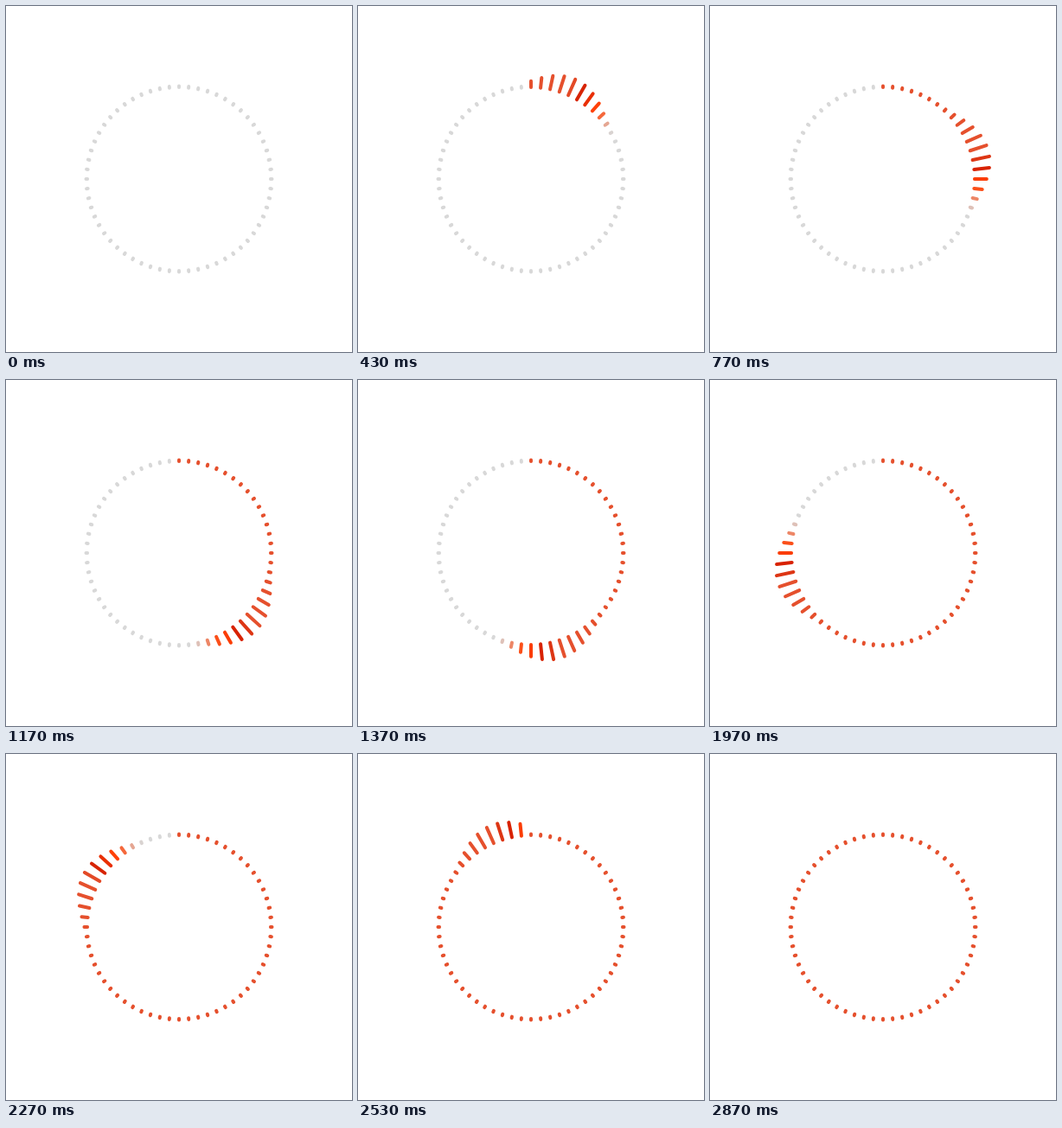
Recreate the animation shown at these times as an HTML page. Size 400 px wide and 400 px high, loop 3530 ms.

```html
<!DOCTYPE html>
<html lang="en">
<head>
<meta charset="utf-8">
<title>Tick ring</title>
<style>
  html, body { margin: 0; width: 100%; height: 100%; overflow: hidden; background: #fff; }
  svg { display: block; width: 100%; height: 100%; }
  line { stroke-width: 4; stroke-linecap: round; }
</style>
</head>
<body>
<svg id="stage" viewBox="0 0 400 400"></svg>
<script>
const LOOP = 3530, COUNT = 60;
const START = 15, STAGGER = 40, DURATION = 510;
const INNER = 105.9, OUTER = 107.5, GROWTH = 18.5;

// Progress and RGB colour of each stop.
const COLORS = [
  [0, [216, 216, 216]],
  [0.28, [255, 64, 4]],
  [0.4, [214, 32, 0]],
  [0.53, [229, 80, 45]],
  [1, [229, 80, 45]]
];

const clamp = x => Math.min(1, Math.max(0, x));
const smooth = x => x * x * (3 - 2 * x);

function colorAt(p) {
  const i = Math.max(1, COLORS.findIndex(([stop]) => p <= stop));
  const [from, a] = COLORS[i - 1];
  const [to, b] = COLORS[i];
  const mix = smooth((p - from) / (to - from));
  return `rgb(${a.map((v, c) => Math.round(v + (b[c] - v) * mix))})`;
}

const stage = document.getElementById('stage');
const ticks = Array.from({ length: COUNT }, (_, i) => {
  const tick = document.createElementNS('http://www.w3.org/2000/svg', 'line');
  tick.setAttribute('transform', `translate(200 200) rotate(${i * 360 / COUNT})`);
  tick.setAttribute('y1', -INNER);
  return stage.appendChild(tick);
});

function render(time) {
  ticks.forEach((tick, i) => {
    const p = clamp((time - START - i * STAGGER) / DURATION);
    const swell = Math.sin(Math.PI * p) ** 2;
    tick.setAttribute('y2', -(OUTER + GROWTH * swell));
    tick.setAttribute('stroke', colorAt(p));
  });
}

let origin;
function loop(now) {
  origin ??= now;
  render((now - origin) % LOOP);
  requestAnimationFrame(loop);
}

render(0);
requestAnimationFrame(loop);
</script>
</body>
</html>
```
